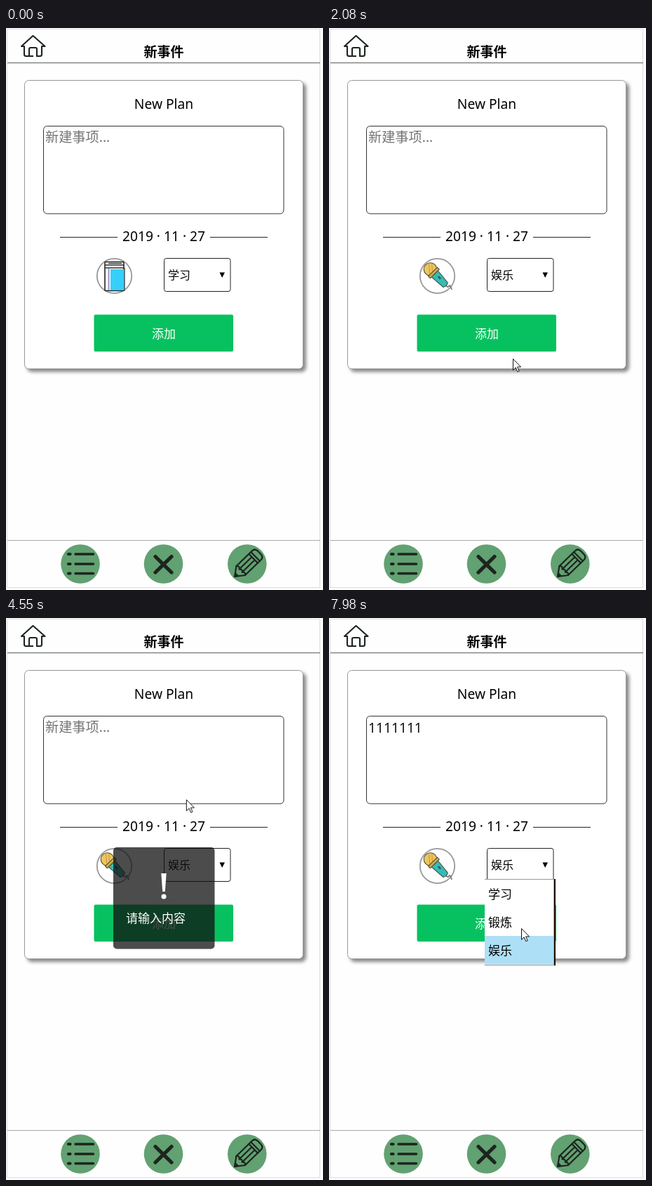
These frames come from a looping animation (452x799 px, 8000 ms). An HTML page:

```html
<!DOCTYPE html>
<html lang="zh-CN">
<head>
<meta charset="utf-8">
<title>新事件</title>
<style>
  html, body { margin: 0; width: 452px; height: 799px; overflow: hidden; background: #fcfcfc; }
  body { position: relative; font: 19.2px "Noto Sans", "Noto Sans CJK SC", "Noto Sans CJK", sans-serif; }
  svg { display: block; }
  .mid { text-anchor: middle; }
  .line { fill: none; stroke: #1d251f; stroke-linecap: round; stroke-linejoin: round; }
  .card { filter: drop-shadow(4px 4px 2.5px #888); }
  .small { font-size: 16px; }
  .item { font-size: 17px; }

  /* 1% of the loop is 80 ms */
  .step { animation: 8s step-end infinite; }
  .study { animation-name: study; }
  .fit { animation-name: fit; }
  .fun { animation-name: fun; }
  .menu { animation-name: menu; }
  .hover { animation-name: hover; }
  .hint { animation-name: hint; }
  .press { animation-name: press; }
  .label { animation-name: label; }
  .bang { animation-name: bang; }
  .toast { animation: toast 8s linear infinite; }
  .pointer { animation: show 8s step-end infinite, move 8s ease-in-out infinite; }
  .typed {
    position: absolute; left: 56px; top: 142px; height: 25px; line-height: 27px;
    width: 0; overflow: hidden; white-space: nowrap; color: #111;
    border-right: 2px solid transparent;
    animation: type 8s step-end infinite, caret 8s step-end infinite;
  }

  @keyframes study { 0% { visibility: visible } 14.125%, 100% { visibility: hidden } }
  @keyframes fit { 0% { visibility: hidden } 14.125% { visibility: visible } 25.75%, 100% { visibility: hidden } }
  @keyframes fun { 0% { visibility: hidden } 25.75%, 100% { visibility: visible } }
  @keyframes menu {
    0%, 14.125%, 25.75% { visibility: hidden }
    8%, 19.5%, 95.5%, 100% { visibility: visible }
  }
  @keyframes hover {
    0% { transform: none }
    12% { transform: translateY(40px) }
    23.25%, 100% { transform: translateY(80px) }
  }
  @keyframes hint { 0% { visibility: visible } 76.5%, 100% { visibility: hidden } }
  @keyframes press { 0%, 51%, 100% { fill: #07c160 } 48.75% { fill: #06ad56 } }
  @keyframes label { 0%, 51%, 100% { opacity: 1 } 48.75% { opacity: .6 } }
  @keyframes bang { 0% { visibility: hidden } 50.375%, 100% { visibility: visible } }
  @keyframes toast {
    0%, 49.1%, 62%, 100% { opacity: 0 }
    49.75% { opacity: .67 }
    50.5%, 60.5% { opacity: 1 }
  }
  @keyframes type {
    0% { width: 0 }
    76.5% { width: 1ch }
    79.25% { width: 2ch }
    81.25% { width: 3ch }
    83.25% { width: 4ch }
    85.25% { width: 5ch }
    87.5% { width: 6ch }
    90.25%, 100% { width: 7ch }
  }
  @keyframes caret {
    0%, 45.75%, 70.75%, 96.1%, 100% { border-color: transparent }
    39.5%, 64.375%, 76.5% { border-color: #111 }
  }
  @keyframes show { 0% { visibility: hidden } .25%, 100% { visibility: visible } }
  @keyframes move {
    0% { transform: translate(366px, 769px) }
    7.5%, 8.25% { transform: translate(292px, 352px) }
    13.75%, 15.25% { transform: translate(267px, 431px) }
    19%, 20.5% { transform: translate(288px, 352px) }
    25.25%, 26.25% { transform: translate(262px, 470px) }
    30.75%, 34.25% { transform: translate(309px, 376px) }
    38.5%, 39.75% { transform: translate(222px, 205px) }
    44.25% { transform: translate(272px, 376px); animation-timing-function: linear }
    46.5% { transform: translate(290px, 483px) }
    48.75%, 50.125% { transform: translate(295px, 407px) }
    54.6% { transform: translate(355px, 330px) }
    56.875% { transform: translate(257px, 258px); animation-timing-function: ease-out }
    62.5%, 79% { transform: translate(197px, 222px) }
    88.125%, 90% { transform: translate(248px, 290px) }
    93.125%, 95.5% { transform: translate(273px, 368px) }
    99.6%, 100% { transform: translate(274px, 441px) }
  }
</style>
</head>
<body>
<svg width="452" height="799" viewBox="0 0 452 799">
  <rect x="1.5" y="1.5" width="446" height="794" fill="#fefefe" stroke="#dedede"/>

  <!-- header -->
  <g class="line" stroke-width="2.1">
    <path d="M38 40H28.5Q26 40 26 37.5V26H22L38.5 11 55.5 26H51V37.5Q51 40 48.5 40H44"/>
    <path d="M38 40H33V30Q33 28 35 28H42Q44 28 44 30V40"/>
  </g>
  <text class="mid" x="225" y="41" font-size="19" font-weight="700">新事件</text>
  <path d="M2 49.5H448" stroke="#858585" stroke-width="1.5"/>

  <!-- form -->
  <rect class="card" x="26.5" y="74.5" width="397" height="410" rx="6" fill="#fff" stroke="#999"/>
  <text class="mid" x="225" y="115">New Plan</text>
  <rect x="53.5" y="139.5" width="342.5" height="124.5" rx="5" fill="#fff" stroke="#333"/>
  <text class="step hint" x="56" y="162" fill="#757575">新建事项...</text>
  <text class="mid" x="225" y="303">2019 · 11 · 27</text>
  <path d="M77 297.5H159M291 297.5H373" stroke="#222"/>

  <circle cx="154.5" cy="352.5" r="24.7" fill="#fff" stroke="#999" stroke-width="1.8"/>
  <rect x="225.5" y="327.5" width="94.5" height="47" rx="3" fill="#fff" stroke="#222"/>
  <path d="M304.5 347.5H312L308.2 355Z"/>

  <g class="step study">
    <rect x="141" y="332.5" width="27" height="41" rx="1" fill="#fff" stroke="#222" stroke-width="1.6"/>
    <path d="M141 337H168M146 334.7H165M141 341H168" stroke="#333" stroke-width="1.3"/>
    <path d="M146.5 342V373" stroke="#a98bc6" stroke-width="2"/>
    <path d="M149 343H169V373H149Z" fill="#35cffa"/>
    <path d="M169 341V374" stroke="#333" stroke-width="1.2"/>
    <text class="small" x="231" y="357">学习</text>
  </g>

  <g class="step fit">
    <g transform="translate(154 353) rotate(-45)" fill="#c98a5b" stroke="#74452b" stroke-width="1.2">
      <rect x="-9" y="-2.5" width="18" height="5" fill="#d9a277"/>
      <rect x="-21" y="-7" width="6" height="14" rx="3"/>
      <rect x="-17" y="-10" width="9" height="20" rx="4"/>
      <rect x="15" y="-7" width="6" height="14" rx="3"/>
      <rect x="8" y="-10" width="9" height="20" rx="4"/>
      <path d="M-12.5-8V8M12.5-8V8"/>
    </g>
    <text class="small" x="231" y="357">锻炼</text>
  </g>

  <g class="step fun">
    <path d="M165 364Q169 370 171 367T175 372" fill="none" stroke="#777" stroke-width="1.8"/>
    <g transform="translate(144.5 343) rotate(46)" stroke="#4b4b43" stroke-width="1.1">
      <path d="M8-6.5 31-4.5Q34 0 31 4.5L8 6.5Z" fill="#35bcb4"/>
      <circle r="9.3" fill="#efc65d"/>
      <path d="M5-9H9V9H5Z" fill="#d8a941"/>
      <path d="M-7-4 4 5M-4-7 4 0" stroke="#b88c36" stroke-width=".8"/>
      <path d="M15-1H20" stroke="#245f65" stroke-width="2.5"/>
    </g>
    <text class="small" x="231" y="357">娱乐</text>
  </g>

  <rect class="step press" x="125.5" y="407.5" width="198.5" height="52.5" rx="2" fill="#07c160"/>
  <text class="mid item step label" x="225" y="441" fill="#fff">添加</text>

  <!-- footer -->
  <path d="M2 728.5H448" stroke="#aaa"/>
  <g fill="#62a171">
    <circle cx="106" cy="762" r="27.8"/>
    <circle cx="224.5" cy="762" r="27.8"/>
    <circle cx="343.8" cy="762" r="27.8"/>
  </g>
  <g class="line">
    <path d="M89 748H91.5M89 762H91.5M89 775.5H91.5" stroke-width="4.2"/>
    <path d="M99 748H124.5M99 762H124.5M99 775.5H124.5" stroke-width="3.4"/>
    <path d="M213 751.5 236 774M236 751.5 213 774" stroke-width="5.2"/>
    <g transform="translate(344 762.5) rotate(-44)" stroke-width="2.2">
      <path d="M-25 0-13-9H18Q24-9 24-3V3Q24 9 18 9H-13Z"/>
      <path d="M-13-9Q-9-6-13-3-9 0-13 3-9 6-13 9M-11-3H12M-11 3H12M12-9V9M16-9V9"/>
      <path d="M-25 0-21-2V2Z" fill="#1d251f"/>
    </g>
  </g>

  <!-- option list -->
  <g class="step menu">
    <rect x="222" y="371" width="101" height="123" fill="#fff"/>
    <rect class="step hover" x="222" y="372" width="98" height="40.5" fill="#ade0f6"/>
    <path d="M222 371.5H322M222 493.5H322" stroke="#999"/>
    <path d="M320.5 372V493" stroke="#d6a04c"/>
    <path d="M322 371V494" stroke="#111" stroke-width="2"/>
    <g class="item">
      <text x="227" y="399">学习</text>
      <text x="227" y="439">锻炼</text>
      <text x="227" y="479">娱乐</text>
    </g>
  </g>

  <!-- warning -->
  <g class="toast" fill="#fff">
    <rect x="153" y="326" width="144.5" height="144.5" rx="5" fill="#111" fill-opacity=".75"/>
    <g class="step bang">
      <path d="M221.3 363H228.7L226.8 389H223.2Z"/>
      <circle cx="225" cy="396" r="3.5"/>
    </g>
    <text class="item" x="171" y="433">请输入内容</text>
  </g>

  <path class="pointer" d="M.5.5V16.3L4.2 12.8 6.8 18.7 9.2 17.7 6.6 11.9H11.6Z" fill="#fff" stroke="#111"/>
</svg>
<div class="typed">1111111</div>
</body>
</html>
```
